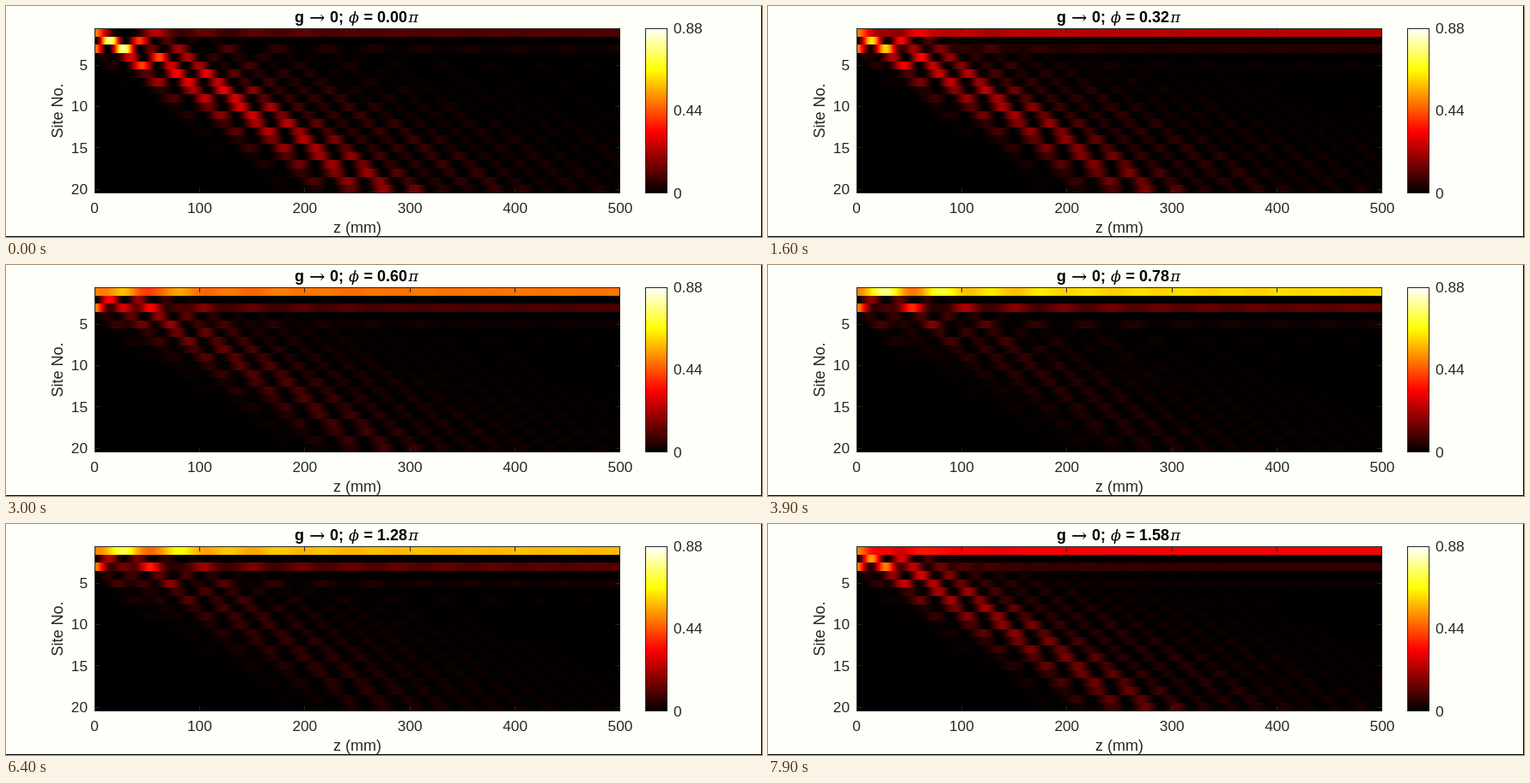
These frames come from a looping animation (880x270 px, 8 s). An HTML page with a canvas:

```html
<!DOCTYPE html>
<html lang="en">
<head>
<meta charset="utf-8">
<style>
html, body { margin: 0; width: 100%; height: 100%; overflow: hidden; background: #fffffa; }
canvas { display: block; }
</style>
</head>
<body>
<canvas id="stage" width="880" height="270"></canvas>
<script>
const ctx = document.getElementById('stage').getContext('2d');
const LEFT = 103, TOP = 26, W = 612, H = 193;
const SHOWN = 20, SITES = 64, K1 = 0.0419, K2 = 0.096, PEAK = 0.88;
const SANS = '"Liberation Sans", Arial, sans-serif';
const SERIF = '"DejaVu Serif", serif';
const INK = '#262626';

// Light spreading from one site of a chain with alternating couplings.
// Amplitudes are real on one sublattice and imaginary on the other.
function propagate(source) {
  const p = new Float64Array(SITES + 2), out = new Float64Array(W * SHOWN);
  const sub = 8, h = 500 / W / sub;
  p[source] = 1;
  const kick = (first, d) => {
    const [before, after] = first === 1 ? [K2, K1] : [K1, K2];
    for (let n = first; n <= SITES; n += 2) p[n] += d * (before * p[n - 1] + after * p[n + 1]);
  };
  const advance = steps => {
    while (steps--) { kick(1, h / 2); kick(2, -h); kick(1, h / 2); }
  };
  for (let x = 0; x < W; x++) {
    advance(sub / 2);
    for (let n = 0; n < SHOWN; n++) out[n * W + x] = p[n + 1];
    advance(sub / 2);
  }
  return out;
}

const fromFirst = propagate(1), fromThird = propagate(3);

// Black, red, yellow, white ramp for v in 0..1
const hot = v => [v / 0.375, (v - 0.375) / 0.375, (v - 0.75) / 0.25]
  .map(c => 255 * Math.min(1, Math.max(0, c)));

const map = document.createElement('canvas');
map.width = W;
map.height = SHOWN;
const mapCtx = map.getContext('2d');
const pixels = mapCtx.createImageData(W, SHOWN);

function drawMap(phi) {
  const c = Math.cos(phi);
  for (let i = 0; i < W * SHOWN; i++) {
    const a = fromFirst[i], b = fromThird[i];
    const rgb = hot((a * a + b * b + 2 * a * b * c) / 2 / PEAK);
    pixels.data.set([...rgb, 255], i * 4);
  }
  mapCtx.putImageData(pixels, 0, 0);
  ctx.imageSmoothingEnabled = false;
  ctx.drawImage(map, LEFT, TOP, W, H);
}

function text(str, x, y, font, align = 'left', baseline = 'alphabetic', color = INK) {
  ctx.font = font;
  ctx.textAlign = align;
  ctx.textBaseline = baseline;
  ctx.fillStyle = color;
  ctx.fillText(str, x, y);
}

function line(x1, y1, x2, y2) {
  ctx.beginPath();
  ctx.moveTo(x1, y1);
  ctx.lineTo(x2, y2);
  ctx.stroke();
}

function drawAxes() {
  const tickFont = '17.3px ' + SANS, labelFont = '18px ' + SANS;
  const right = LEFT + W, bottom = TOP + H;
  ctx.strokeStyle = INK;
  ctx.lineWidth = 1;
  ctx.strokeRect(LEFT + 0.5, TOP + 0.5, W - 1, H - 1);
  for (let z = 0; z <= 500; z += 100) {
    const x = LEFT + z / 500 * W, tx = Math.min(Math.floor(x) + 0.5, right - 0.5);
    line(tx, TOP, tx, TOP + 6);
    line(tx, bottom - 6, tx, bottom);
    text(z, x, 237, tickFont, 'center', 'middle');
  }
  for (let n = 5; n <= SHOWN; n += 5) {
    const y = TOP + (n - 0.5) / SHOWN * H, ty = Math.floor(y) + 0.5;
    line(LEFT, ty, LEFT + 6, ty);
    line(right - 6, ty, right, ty);
    text(n, 95, y + 1, tickFont, 'right', 'middle');
  }
  text('z (mm)', 409, 265, labelFont, 'center');
  ctx.save();
  ctx.translate(66, 122.5);
  ctx.rotate(-Math.PI / 2);
  text('Site No.', 0, 0, labelFont, 'center');
  ctx.restore();
}

function drawColorbar() {
  const x = 744, w = 26;
  const ramp = ctx.createLinearGradient(0, TOP + H, 0, TOP);
  for (const v of [0, 0.375, 0.75, 1]) ramp.addColorStop(v, `rgb(${hot(v)})`);
  ctx.fillStyle = ramp;
  ctx.fillRect(x, TOP, w, H);
  ctx.strokeRect(x + 0.5, TOP + 0.5, w - 1, H - 1);
  ['0.88', '0.44', '0'].forEach((label, i) =>
    text(label, 777, TOP + 1 + i * H / 2, '17.3px ' + SANS, 'left', 'middle'));
}

function drawTitle(turns) {
  const bold = 'bold 18px ' + SANS, symbol = 'italic 17.5px ' + SERIF;
  const put = (str, x, font, y = 19) => text(str, x, y, font, 'left', 'alphabetic', '#000');
  put('g', 336, bold);
  put('→', 353, '22px ' + SERIF, 21);
  put('0;', 377, bold);
  put('ϕ', 399, symbol);
  put('= ' + turns.toFixed(2), 416.5, bold);
  put('π', 468.5, symbol);
}

function frame(now) {
  const turns = Math.floor(now % 8000 / 100) * 0.02;
  ctx.fillStyle = '#fffffa';
  ctx.fillRect(0, 0, 880, 270);
  drawMap(turns * Math.PI);
  drawAxes();
  drawColorbar();
  drawTitle(turns);
  ctx.fillStyle = '#000';
  ctx.fillRect(0, 269, 880, 1);
  ctx.fillRect(879, 0, 1, 270);
}

let start, lastStep = -1;
function tick(now) {
  start ??= now;
  const step = Math.floor((now - start) / 100);
  if (step !== lastStep) frame(now - start);
  lastStep = step;
  requestAnimationFrame(tick);
}
frame(0);
requestAnimationFrame(tick);
</script>
</body>
</html>
```
